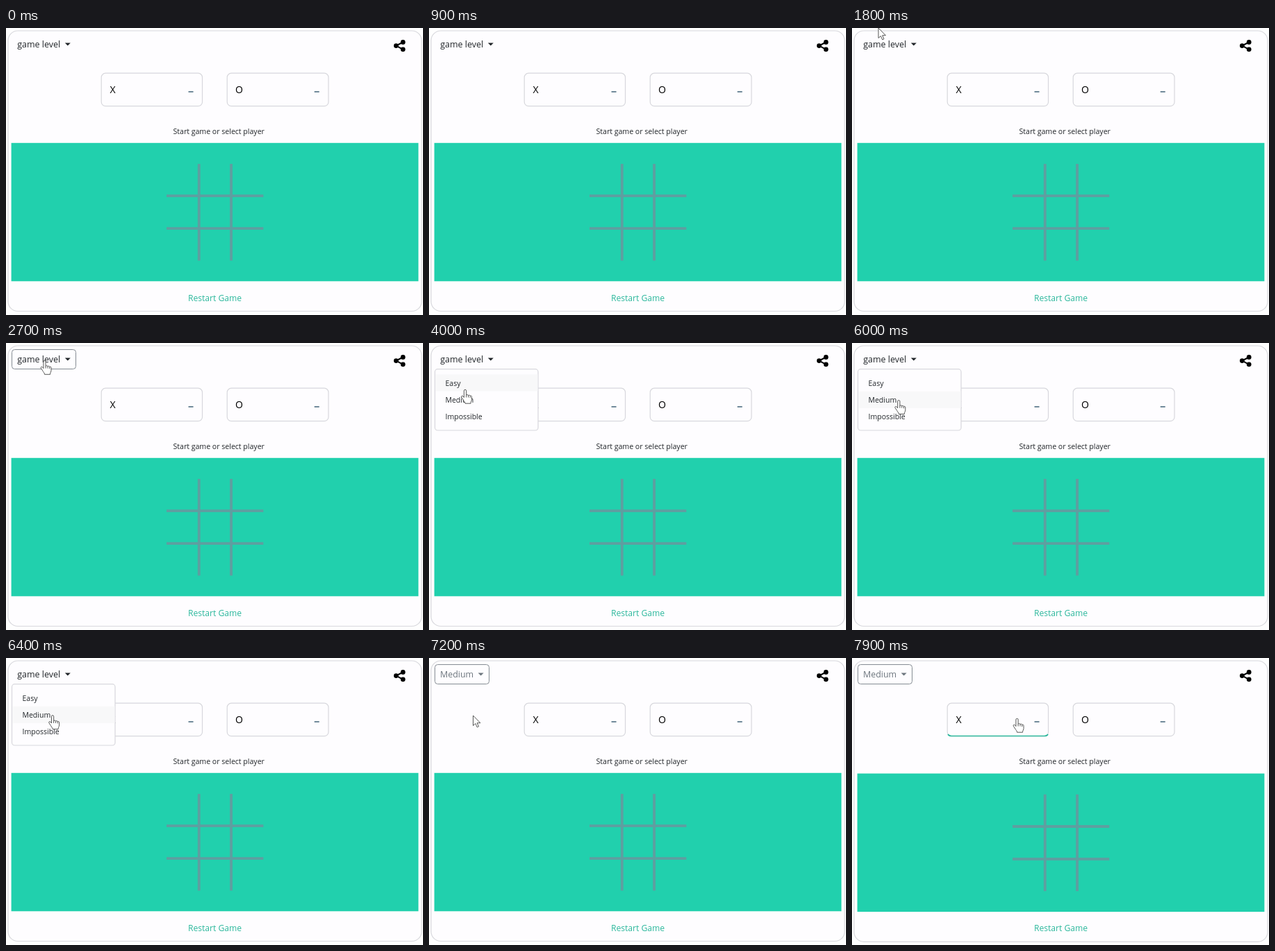
An HTML page that plays this animation: 600 px wide and 414 px high, repeating every 8000 ms.

```html
<!DOCTYPE html>
<html lang="en">
<head>
<meta charset="utf-8">
<title>Tic-tac-toe level menu</title>
<style>
  html, body { margin: 0; width: 100%; height: 100%; overflow: hidden; background: #fefefe; }
  svg { display: block; font-family: "Open Sans", "Noto Sans", sans-serif; fill: #212529; }
  .box { fill: #fefdff; stroke: #d8d8dd; stroke-width: 1.2; }
  .outline { fill: none; stroke: #858c93; }
  .big { font-size: 12.45px; }
  .small { font-size: 10.5px; }
  .mark { font-size: 14px; font-weight: 500; fill: #000; }
  .grid { stroke: #5f9ea0; stroke-width: 3.8; }
  .dash { stroke: #70899a; stroke-width: 2; }
  .cursor { fill: #fff; stroke: #444; stroke-width: 0.9; stroke-linejoin: round; }
</style>
</head>
<body>
<svg width="600" height="414" viewBox="0 0 600 414">
  <rect id="card" class="box" x="3" y="4" width="595" height="404.5" rx="14"/>

  <g stroke="#000" stroke-width="2" fill="#000">
    <path d="M571.2 20.5L561.3 25.6L571.2 30.8" fill="none"/>
    <circle cx="571.2" cy="20.4" r="2.4"/>
    <circle cx="561.3" cy="25.6" r="2.4"/>
    <circle cx="571.2" cy="30.8" r="2.4"/>
  </g>

  <rect class="box" x="137.2" y="65.2" width="145.3" height="47.5" rx="6"/>
  <rect class="box" x="318.2" y="65.2" width="145.8" height="47.5" rx="6"/>
  <path id="underline" d="M138 110Q139.5 112.5 143 112.5H277Q280.5 112.5 282 110" fill="none" stroke="#2db89d" stroke-width="1.7"/>
  <text class="mark" x="149.5" y="94">X</text>
  <text class="mark" x="330" y="94">O</text>
  <path class="dash" d="M262.5 92H269.5M443.7 92H450.7"/>

  <g id="lower">
    <text x="306.2" y="152.5" text-anchor="middle" font-size="10.57">Start game or select player</text>
    <rect x="7.6" y="165.8" width="585.8" height="199.5" fill="#21d0ad"/>
    <path class="grid" d="M277.7 196V335.5M324 196V335.5M231 242.2H370.3M231 289.2H370.3"/>
    <text x="300.5" y="393.7" text-anchor="middle" font-size="12.1" fill="#2db89d">Restart Game</text>
  </g>

  <g id="level">
    <rect id="hover" class="outline" x="8.5" y="9.5" width="92" height="28" rx="4"/>
    <text class="big" x="16.3" y="28">game level</text>
    <path d="M84.8 21.5H92.8L88.8 25.5Z"/>
  </g>
  <g id="chosen" fill="#6c757d">
    <rect class="outline" x="8.5" y="9.5" width="78" height="28" rx="4"/>
    <text class="big" x="16" y="28">Medium</text>
    <path d="M70.6 21.5H78.6L74.6 25.5Z"/>
  </g>

  <g id="menu">
    <rect class="box" x="8.5" y="37.7" width="148.5" height="88.3" rx="4"/>
    <rect id="row" x="9.2" y="45.3" width="147.2" height="24.2" fill="#f8f8f9"/>
    <text class="small" x="23.5" y="61.5">Easy</text>
    <text class="small" x="23.5" y="86">Medium</text>
    <text class="small" x="23.5" y="110">Impossible</text>
  </g>

  <path id="arrow" class="cursor" d="M0 0V14.5L3.4 11.5L5.7 16.8L8 15.8L5.7 10.7H10.4Z"/>
  <path id="hand" class="cursor" d="M-1.6 11V1.4a1.6 1.6 0 0 1 3.2 0V8c.5-1.4 2.7-1.2 2.9.3c.6-1 2.5-.8 2.7.6c.7-.7 2.3-.4 2.3 1.2V14c0 2-1.5 3-1.5 5.7H0c0-2-1.6-3-2.6-5l-2.6-4c-.8-1.5 1-2.7 2.2-1.4ZM1.6 8v3M4.5 8.3V11M7.2 9v2.5"/>
</svg>
<script>
const LOOP = 8000, STEP = 100;
const OPEN = 3000, PICK = 6700;
// Pointer path: time, x, y
const path = [
  [1500, 30, -22], [1800, 38, 0], [2200, 55.5, 25], [3100, 55.5, 26], [3600, 52, 50],
  [4000, 52, 67.5], [4400, 56, 78], [5400, 64, 82], [6000, 67.3, 82.8], [6600, 67, 83],
  [7100, 61, 83], [7300, 66, 83], [7700, 222, 87], [7900, 237.5, 87.5]
];
const $ = id => document.getElementById(id);
const show = (id, on) => $(id).style.display = on ? "" : "none";

function pointer(t) {
  const i = path.findIndex(p => p[0] >= t);
  if (i <= 0) return path[0].slice(1);
  const [t0, x0, y0] = path[i - 1], [t1, x1, y1] = path[i];
  const k = (t - t0) / (t1 - t0), e = k * k * (3 - 2 * k);
  return [x0 + (x1 - x0) * e, y0 + (y1 - y0) * e];
}

function draw(t) {
  const [x, y] = pointer(t);
  const picked = t >= PICK, open = t >= OPEN && !picked;
  const onButton = !picked && y >= 9 && y < 38;
  const onPlayer = picked && x >= 137;
  const hand = onButton || open || onPlayer;

  show("level", !picked);
  show("hover", onButton);
  show("chosen", picked);
  show("menu", open);
  show("row", y >= 45);
  $("row").setAttribute("y", y < 69.5 ? 45.3 : 69.7);

  show("underline", onPlayer);
  $("lower").setAttribute("transform", `translate(0 ${onPlayer ? 0.8 : 0})`);
  $("card").setAttribute("height", onPlayer ? 405.3 : 404.5);

  show("hand", hand);
  show("arrow", !hand);
  $(hand ? "hand" : "arrow").setAttribute("transform", `translate(${x} ${y})`);
}

function tick() {
  draw(Math.floor(performance.now() % LOOP / STEP) * STEP);
  requestAnimationFrame(tick);
}
tick();
</script>
</body>
</html>
```
